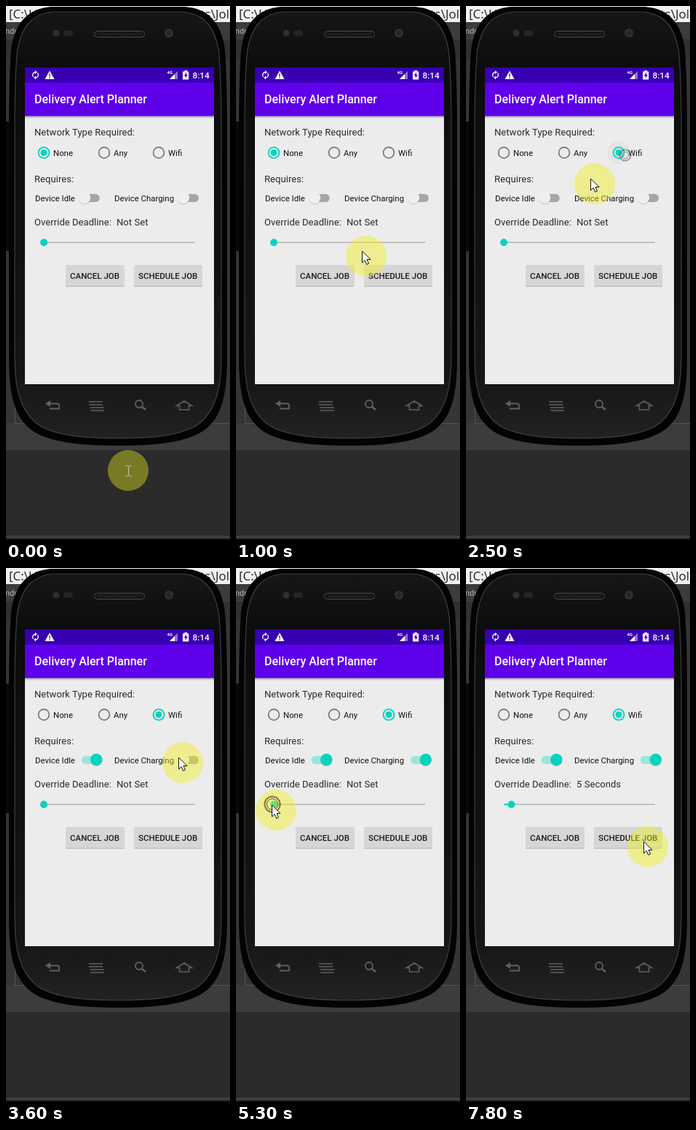
Animation of 308x730 px, one loop 8 s. Source, as an HTML page:

```html
<!DOCTYPE html>
<html lang="en">
<head>
<meta charset="utf-8">
<title>Job options</title>
<style>
html, body { margin: 0; width: 100%; height: 100%; overflow: hidden; background: #2b2b2b; }
svg { display: block; width: 308px; height: 730px; font-family: Roboto, sans-serif; }
.label { font-size: 13px; letter-spacing: .06px; fill: #2a2a2a; }
.option { font-size: 11.4px; fill: #111; }
.action { font-size: 11.5px; font-weight: 500; fill: #1c1c1c; }
.path { font: 17px "Open Sans", sans-serif; fill: #222; }
.nav { fill: none; stroke: #606060; stroke-width: 1.800; }
</style>
</head>
<body>
<svg viewBox="0 0 308 730" xmlns="http://www.w3.org/2000/svg">
  <defs>
    <linearGradient id="face" x1="0" y1="0" x2="0" y2="1">
      <stop offset="0" stop-color="#161616"/>
      <stop offset=".14" stop-color="#0c0c0c"/>
      <stop offset=".85" stop-color="#151515"/>
      <stop offset="1" stop-color="#222"/>
    </linearGradient>
    <linearGradient id="shade" x1="0" y1="0" x2="0" y2="1">
      <stop offset="0" stop-color="#000" stop-opacity=".3"/>
      <stop offset="1" stop-color="#000" stop-opacity="0"/>
    </linearGradient>
    <pattern id="mesh" width="3" height="3" patternUnits="userSpaceOnUse">
      <path d="M0 3L3 0" stroke="#484848" stroke-width=".8"/>
    </pattern>
  </defs>

  <!-- desktop -->
  <path fill="#3b3c3d" d="M0 0H308V607H0z"/>
  <path fill="#f1f1f1" d="M0 0H308V22H0z"/>
  <text class="path" x="4" y="17">[C:\Us</text>
  <text class="path" x="307" y="17" text-anchor="end">cts\Jol</text>
  <text x="-1" y="38" font-size="11" fill="#b5b5b5">ndo</text>
  <path fill="#2e3031" d="M0 46H308V72H0z"/>
  <path fill="#343536" d="M0 72H308V570H0z"/>
  <path stroke="#515253" d="M12.500 540V570.500H308" fill="none"/>
  <path fill="#2b2b2b" d="M0 607H308V724H0z"/>
  <path fill="#3c3f41" d="M0 724H308V728H0z"/>
  <path fill="#111" d="M0 728H308V730H0z"/>

  <!-- phone -->
  <path fill="#030303" d="M62 1C30 4 12 22 7 60Q4 100 4 170V480C4 530 11 560 33 578C57 597 104 601 154 601S251 597 275 578C297 560 304 530 304 480V170Q304 100 301 60C296 22 278 4 246 1z"/>
  <path fill="url(#face)" stroke="#3f3f3f" stroke-width="1.200" d="M66 8C36 10 20 28 15 66Q12 104 12 170V478C12 524 20 552 41 570C63 587 106 591 154 591S245 587 267 570C288 552 296 524 296 478V170Q296 104 293 66C288 28 272 10 242 8z"/>
  <path fill="#0a0a0a" d="M0 158H4V335H0z"/>
  <g fill="#303030"><circle cx="69" cy="37" r="4.500"/><circle cx="83" cy="37" r="4" fill="#252525"/><circle cx="88" cy="37" r="4" fill="#252525"/>
    <circle cx="224" cy="37" r="6"/><circle cx="224" cy="37" r="3" fill="#242424"/></g>
  <rect x="121.500" y="34.500" width="69" height="8" rx="4" fill="#0c0c0c" stroke="#505050"/>
  <rect x="124" y="36" width="64" height="5" rx="2.500" fill="url(#mesh)"/>
  <g class="nav">
    <path d="M60 543.500H70Q73 543.500 73 546.500V550.500H60"/>
    <path fill="#606060" stroke="none" d="M54 543.500L61 539V548z"/>
    <path d="M114 541H133M114 545H133M116 549H135M116 553H135" stroke-width="1.500"/>
    <circle cx="183" cy="544" r="5"/><path d="M187 548L192 552" stroke-width="2.800"/>
    <path d="M234.500 546.500L245 540L255.500 546.500H251.500V552H238.500V546.500z" stroke-width="1.600"/>
  </g>

  <!-- app -->
  <path fill="#ececec" d="M26 84H286V517H26z"/>
  <path fill="#3700b0" d="M26 84H286V105H26z"/>
  <path fill="#5f00ea" d="M26 104.500H286V150.500H26z"/>
  <path fill="url(#shade)" d="M26 150.500H286V154H26z"/>
  <g fill="none" stroke="#fff" stroke-width="1.300">
    <path d="M37.500 97A4 4 0 0 1 40 90.500M43.500 91.500A4 4 0 0 1 41 98"/>
    <path fill="#fff" stroke="none" d="M40 88V93L42.800 90.500zM41 95.500V100.500L38.200 98z"/>
  </g>
  <path fill="#fff" d="M60 88.500L66.500 100H53.500z"/>
  <path stroke="#3700b0" stroke-width="1.400" d="M60 92.500V96.300M60 97.300V98.700"/>
  <text x="221.500" y="93" font-size="6" font-weight="700" fill="#fff">4G</text>
  <path fill="#fff" fill-opacity=".45" d="M236 89V100H225z"/>
  <path fill="#fff" d="M232 93V100H225z"/>
  <path fill="#fff" d="M243 89.500H245.500V88H249V89.500H251.200V100.500H243z"/>
  <path fill="#3700b0" d="M248 90.500L244.800 95.500H246.800V99L249.800 94H248z"/>
  <text x="256.500" y="98.500" font-size="11.800" font-weight="500" fill="#fff">8:14</text>
  <text x="39" y="133" font-size="16" font-weight="500" fill="#fff">Delivery Alert Planner</text>
  <text class="label" x="39" y="177">Network Type Required:</text>
  <text class="label" x="39" y="241">Requires:</text>
  <text class="label" x="39" y="300">Override Deadline:</text>
  <text class="label" x="152" y="300" id="value"></text>
  <text class="option" x="65" y="204.500">None</text>
  <text class="option" x="148" y="204.500">Any</text>
  <text class="option" x="223" y="204.500">Wifi</text>
  <text class="option" x="40" y="267">Device Idle</text>
  <text class="option" x="149" y="267">Device Charging</text>
  <circle id="ripple" cx="210" cy="200.500" r="16" fill="#000"/>
  <g id="controls"></g>
  <path stroke="#b3b3b3" stroke-width="1.500" d="M52 323.300H260"/>
  <path id="progress" stroke="#08d3bd" stroke-width="1.800"/>
  <circle id="thumb" cy="323.200" fill="#08d3bd"/>
  <g id="buttons"></g>

  <!-- pointer -->
  <circle id="halo" r="28" fill="#f0ee1e"/>
  <g id="ring" fill="none">
    <circle id="outer" stroke-width="2.200" stroke-dasharray="2 .7"/>
    <circle id="inner" stroke-width="1"/>
  </g>
  <path id="arrow" fill="#fff" stroke="#111" d="M0 0V16L3.700 12.600L6.200 18.300L9 17L6.500 11.500H11.500z"/>
  <path id="beam" fill="none" stroke="#c4c4b4" d="M-4 -7H-1.500L0 -6L1.500 -7H4M0 -6V6M-4 7H-1.500L0 6L1.500 7H4"/>
</svg>
<script>
const LOOP = 8000, STEP = 100, TEAL = '#08d3bd';
const $ = id => document.getElementById(id);
const clamp = v => Math.max(0, Math.min(1, v));
const mix = (a, b, k) => a + (b - a) * k;

function make(parent, tag, attrs) {
  const el = document.createElementNS('http://www.w3.org/2000/svg', tag);
  set(el, attrs);
  return parent.appendChild(el);
}
function set(el, attrs) {
  for (const name in attrs) el.setAttribute(name, attrs[name]);
}

// Halo centre: time, x, y
const route = [
  [0, 168, 635], [200, 150, 646], [400, 97, 683], [500, 92, 675], [700, 160, 618],
  [900, 186, 458], [1000, 179, 342], [1100, 179, 342], [1400, 192, 300], [1800, 226, 214],
  [2300, 226, 214], [2500, 177, 243], [2800, 124, 270], [3200, 124, 272],
  [3600, 243, 266], [3800, 254, 267], [4200, 254, 267], [4400, 235, 240], [4700, 76, 334],
  [4800, 60, 340], [5000, 55, 331], [5500, 55, 331], [6100, 66, 331], [6300, 66, 331],
  [6400, 68, 331], [6600, 68, 331], [6800, 70, 332], [7100, 70, 332],
  [7300, 105, 345], [7600, 222, 375], [7800, 250, 381], [8000, 250, 381]
];
// Clicks: time, x, y
const clicks = [[2200, 219, 204], [3000, 119, 263], [4000, 249, 260], [5300, 50, 323]];
// Slider value by time
const seconds = [[0, 0], [5600, 1], [5900, 2], [6100, 3], [6400, 4], [6800, 5]];

function position(t) {
  const i = Math.max(1, route.findIndex(p => p[0] > t));
  const [a, b] = [route[i - 1], route[i]];
  const k = (t - a[0]) / (b[0] - a[0]);
  return [mix(a[1], b[1], k), mix(a[2], b[2], k)];
}

const radios = [52, 135, 210].map(cx => ({
  rim: make($('controls'), 'circle', { cx, cy: 200.5, r: 7.4, fill: 'none' }),
  dot: make($('controls'), 'circle', { cx, cy: 200.5, fill: TEAL })
}));

const switches = [[108, 124.3, 3000], [244, 260.8, 4000]].map(([off, on, start]) => {
  const mid = (off + on) / 2;
  return {
    off, on, start,
    track: make($('controls'), 'rect', { x: mid - 12.5, y: 257, width: 25, height: 11, rx: 5.5 }),
    shadow: make($('controls'), 'circle', { cy: 263.3, r: 8, fill: '#000', opacity: .16 }),
    knob: make($('controls'), 'circle', { cy: 262, r: 8.2 })
  };
});

[[82, 80.5, 'CANCEL JOB'], [176, 94, 'SCHEDULE JOB']].forEach(([x, width, label]) => {
  const box = { x, width, height: 28.5, rx: 1.5 };
  make($('buttons'), 'rect', { ...box, y: 355.5, fill: '#000', opacity: .18 });
  make($('buttons'), 'rect', { ...box, y: 354, fill: '#d6d6d6' });
  make($('buttons'), 'text', { class: 'action', x: x + 6, y: 373 }).textContent = label;
});

function drawControls(t) {
  const picked = t < 2200 ? 0 : 2;
  radios.forEach(({ rim, dot }, i) => {
    const on = picked === i;
    set(rim, { stroke: on ? TEAL : '#757575', 'stroke-width': on ? 1.9 : 1.7 });
    set(dot, { r: on ? 4.5 : 0 });
  });
  set($('ripple'), { opacity: t < 2100 ? 0 : .06 * clamp((2800 - t) / 500) });

  for (const { off, on, start, track, shadow, knob } of switches) {
    const k = clamp((t - start) / 300), eased = k * k * (3 - 2 * k);
    const cx = mix(off, on, eased);
    set(track, { fill: k > .4 ? '#9ce5db' : '#a6a6a6' });
    set(shadow, { cx });
    set(knob, { cx, fill: k > .4 ? TEAL : '#efefef' });
  }

  const n = seconds.filter(s => s[0] <= t).pop()[1];
  const x = 52 + n * 2.08;
  $('value').textContent = n ? n + ' Seconds' : 'Not Set';
  set($('progress'), { d: `M52 323.3H${x}` });
  set($('thumb'), { cx: x, r: t > 5400 && t < 7000 ? 7.5 : 5 });
}

function drawPointer(t) {
  const [x, y] = position(t), overText = y > 600;
  set($('halo'), { cx: x, cy: y, opacity: overText ? .4 : .45 });
  set($('arrow'), { transform: `translate(${x - 5.5} ${y - 7})`, opacity: overText ? 0 : 1 });
  set($('beam'), { transform: `translate(${x + .5} ${y + .5})`, opacity: overText ? 1 : 0 });

  const click = clicks.find(c => t >= c[0] && t < c[0] + 500);
  set($('ring'), { opacity: 0 });
  if (!click) return;
  const age = (t - click[0]) / 500, r = 10.5 - 5 * age;
  const stroke = age < .3 ? '#51451c' : '#555';
  set($('ring'), { transform: `translate(${click[1]} ${click[2]})`, opacity: .9 - .5 * age, stroke });
  set($('outer'), { r });
  set($('inner'), { r: r - 3 });
}

const origin = performance.now();
function tick() {
  const now = performance.now() - origin;
  const t = Math.floor((now % LOOP) / STEP) * STEP;
  drawControls(t);
  drawPointer(t);
  requestAnimationFrame(tick);
}
tick();
</script>
</body>
</html>
```
